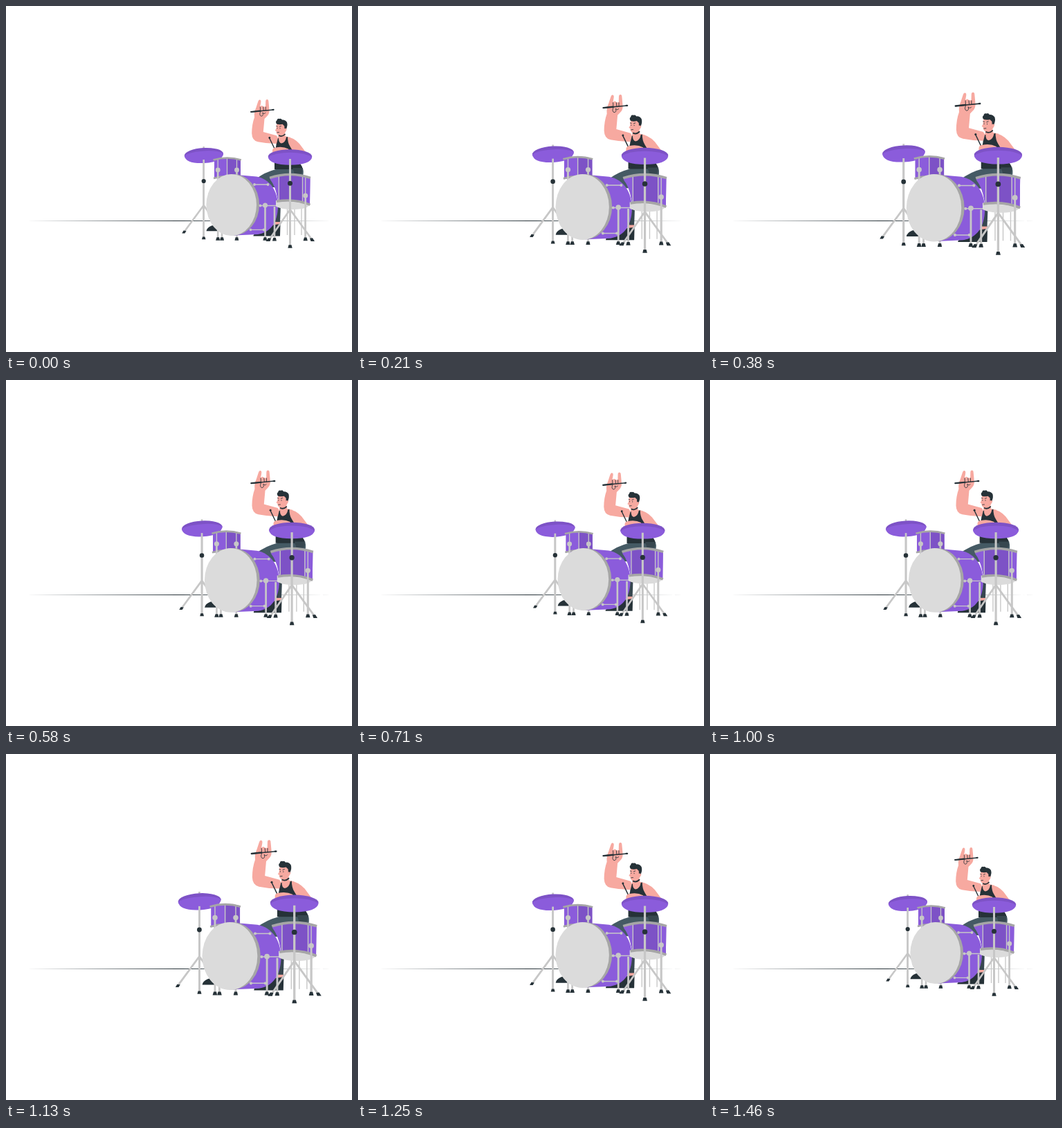
An HTML page that plays this animation: 500x500 px, repeating every 1.5 s.

```html
<!DOCTYPE html>
<html lang="en">
<head>
<meta charset="utf-8">
<title>Drummer</title>
<style>
html, body { margin: 0; width: 100%; height: 100%; overflow: hidden; background: #fff; }
svg { display: block; width: 100%; height: 100%; }
.ink { fill: #263238; }
.skin { fill: #f7a9a0; }
.jeans { fill: #455a64; }
.main { fill: #8b5cdb; }
.shade { fill: #7d52c6; }
.head { fill: #dbdbdb; }
.rim { fill: #a6a6a6; }
.metal { fill: #c7c7c7; }
.rod, .hoop, .line { fill: none; stroke: #c7c7c7; stroke-width: 2.6; }
.hoop { stroke: #a6a6a6; stroke-width: 3.4; }
.thin { stroke-width: 1.3; }
.line { stroke: #263238; stroke-width: .8; stroke-linecap: round; stroke-linejoin: round; }
</style>
</head>
<body>
<svg viewBox="0 0 500 500">
  <path class="ink" d="M30 310.5L250 310.1 470 310.5 250 310.9z"/>

  <g id="band">
    <!-- stool -->
    <path class="rod thin" d="M406.5 286V331M417 286V331M427 286V331"/>

    <!-- legs -->
    <path class="jeans" d="M390 234L428 233Q431 238 429 246L400 262 372 262 361 250Q374 240 390 236z"/>
    <path d="M386 285H397L396 313H386z" fill="#37474f"/>
    <path class="skin" d="M385 312H396V317H385z"/>
    <path class="ink" d="M385 316.500L396.500 315 396 332.500H357.500Q357 329.500 362 329 373 327 385 316.500z"/>
    <path class="ink" d="M305 316L297 317.500Q290 320.500 289.500 325.300H306z"/>

    <!-- body -->
    <path class="skin" d="M403 188Q416 190 424 199L433 211 406 211z"/>
    <path class="skin" d="M395 180H402.500L404 190 407 194 398 201 392 196z"/>
    <path class="ink" d="M391.500 191.500L394 191Q394 198 398 198.500 404 197 405 189.500L407 189Q407 198 410.500 203L428 232.500V236H388V212Q391 202 391.500 191.500z"/>
    <path d="M414 234L429 234 427.500 242 417 243z" fill="#37474f"/>

    <!-- head -->
    <path class="skin" d="M392 169Q390 173 390.500 177L388.800 180 390.500 181Q391 187 396 187.300 402 187 405.500 179L405 170z"/>
    <path class="ink" d="M391 170.500Q388.800 167 391.500 165.300 391.500 162 395.500 163 397.500 162 399 164.500 403.500 164 406 168 407.500 173 404.500 178.500L402.500 178.500 402.300 173.500 399.500 170.800Q395 172 391 170.500z"/>
    <circle class="skin" cx="403.500" cy="178.500" r="1.700"/>
    <path class="line" d="M390.800 173.500L392.300 174M395.300 174.300L397.500 173.500M392 176.300V176.900M396 176.500V177.100M391.800 182.800L394.500 182.500"/>
    <path class="line" style="stroke-width:1.700" d="M394.700 187.300Q399 189.500 403 185.500"/>

    <!-- raised arm -->
    <path class="skin" d="M366.300 135.600Q369 135.500 368.300 139.500L367.200 145.500Q370 142.500 372 145.500L375 145.500 375.200 138Q375.300 135 377.300 135 379.300 135 379.400 138L380.500 150Q381 156 376.500 160L373.500 163 371.800 182 391 187.300 393 191 391 199Q377 199 364 196.300 355.500 194.500 355.200 184 355.300 171 359 161 358.200 153 361 148L364.300 138Q365 135.800 366.300 135.600z"/>
    <path class="line" style="stroke-width:1.500" d="M354 153L386 150"/>
    <path class="line" style="stroke-width:2.200" d="M354.300 153L367 151.700M385.300 150L386.600 149.900"/>
    <path class="line" d="M367.300 146L367.800 152.500M371.800 146L372.300 151M375.300 146V151M367.500 153Q365.500 158 368.800 159.200 372.500 159 371 154.500M371 154.500Q373.500 157 375 154.500"/>

    <!-- lowered hand -->
    <path class="line" style="stroke-width:1.400" d="M380.500 190.500L388 206"/>
    <circle class="ink" cx="380.800" cy="190.500" r="1.400"/>
    <path class="skin" d="M385 209Q385 205 390 204.500 400 202.500 408 206.500L411 212H385z"/>

    <!-- left stand and cymbal -->
    <path class="rod" d="M285.700 203V335M285.700 288L258.500 325M285.700 288L309 321"/>
    <g transform="rotate(-3 286 216)">
      <ellipse class="shade" cx="286" cy="214.800" rx="28.200" ry="9.800"/>
      <path class="main" d="M257.800 215Q259 226.800 286 227 313 226.800 314.200 214 304 209.500 290 209.500 266 209.500 257.800 215z"/>
    </g>
    <path class="rod" d="M285.700 222V335"/>
    <circle class="ink" cx="285.700" cy="253" r="3.100"/>

    <!-- left tom -->
    <path class="rod" d="M306.200 237V337M312 320V337M333.500 237V337"/>
    <path class="main" d="M301 222Q320 216 339 222L339 249H301z"/>
    <path class="shade" d="M320 219Q331 219 339 222V249H320z"/>
    <path class="rod thin" d="M319.500 219V246M333.500 220V237M306.200 221V237"/>
    <path class="hoop" d="M299.500 222.600Q319.500 216.500 339.800 222.600M300 249Q319.500 243 339 249" style="stroke-width:2.600"/>
    <path class="rod" d="M306.200 237V252M333.500 237V252"/>
    <circle class="metal" cx="306.200" cy="237" r="3.400"/>
    <circle class="metal" cx="333.500" cy="237" r="3.400"/>

    <!-- bass drum -->
    <path class="main" d="M328 243.500L362 246.500C382 250 393 268 393 290 392.500 312 383 327 364 330L330 331.500z"/>
    <ellipse class="rim" cx="329" cy="287.300" rx="37" ry="44.300"/>
    <ellipse class="head" cx="325.700" cy="287.500" rx="36.300" ry="44.600"/>
    <path class="rod thin" d="M359 258H379M367 288.500H393M353.500 323.300H373"/>
    <path class="rod" style="stroke-width:3.800;stroke-linecap:round" d="M359 258h.01M378.500 258h.01M367.500 288.500h.01M392 288.500h.01M353.500 323.300h.01M372.500 323.300h.01"/>

    <!-- right tom -->
    <path class="rod" d="M388 290V337M432.700 274V337"/>
    <path class="head" d="M390 281L439.500 286Q437 293.500 416 294 396 294 390 289z"/>
    <path class="shade" d="M382 247Q411 240 439.500 247.500L439 287Q416 278 393 281.500L391 270Q388 258 382 251z"/>
    <path class="main" d="M382 247L394 245V281L392 276Q389 260 382 251zM428 244.500L439.500 247.500 439 287 428 283z"/>
    <path class="rod thin" d="M394.300 246V281M428.500 245V282M432.700 246V274"/>
    <path class="hoop" d="M381 248.300Q410.500 238.800 440 248.300"/>
    <path class="hoop" d="M391 282.300Q417 278 439.500 287.300"/>
    <path class="rod" d="M374.500 288V337M432.700 274V337"/>
    <circle class="metal" cx="374.500" cy="288" r="3.500"/>
    <circle class="metal" cx="432.700" cy="274" r="3.500"/>

    <!-- right stand and cymbal -->
    <path class="rod" d="M410.500 294L381.500 336M410.500 294L441 336"/>
    <ellipse class="shade" cx="410.500" cy="217.500" rx="31.700" ry="10.300"/>
    <path class="main" d="M378.800 218.500Q381 229.600 410.500 229.800 440 229.600 442.200 218.500 432 211.700 410.500 211.700 389 211.700 378.800 218.500z"/>
    <path class="rod" style="stroke-width:3" d="M410.500 221V347"/>
    <circle class="ink" cx="410.500" cy="256.200" r="3.500"/>

    <!-- rubber feet -->
    <path class="ink" d="M284 333.500h3.500l1 3.800h-5.500zM256.500 324.500l4 .6-2 3.300h-4.200z
      M304.500 334.300h3.600l1 4.500h-6zM310.300 334.300h3.600l1.200 4.500h-6zM331.700 334.300h3.600l1 4.500h-5.800z
      M372.700 334.300h3.600l1 4.500h-6zM386.200 335h3.700l1 4.500h-6zM430.900 334.600h3.700l1.200 4.700h-6.200z
      M379 335.300l4 .5-1.500 4.200h-6zM439 335.700l4-.5 3 4.700h-5.500zM408.500 345.300h4l1.200 4.400h-6.300z"/>
  </g>
</svg>
<script>
const LOOP = 1500, STEPS = 36;
const CX = 348.5, CY = 243;
// [step, scale] of the double beat
const beat = [
  [0, 1], [5, 1.065], [8, 1.096], [9, 1.095], [14, 1.042], [18, 1.004], [19, 1],
  [20, 1.004], [24, 1.042], [26, 1.077], [27, 1.1], [28, 1.094], [30, 1.065], [35, 1], [36, 1]
];
const band = document.getElementById('band');

function scaleAt(step) {
  const i = beat.findIndex(([s]) => s > step);
  const [s0, a] = beat[i - 1], [s1, b] = beat[i];
  return a + (b - a) * (step - s0) / (s1 - s0);
}

function draw(now) {
  const step = Math.floor((now + 5) * STEPS / LOOP) % STEPS;
  const k = scaleAt(step);
  band.setAttribute('transform', `translate(${CX} ${CY}) scale(${k}) translate(${-CX} ${-CY})`);
}

const start = performance.now();
function tick() {
  draw(performance.now() - start);
  requestAnimationFrame(tick);
}
tick();
</script>
</body>
</html>
```
